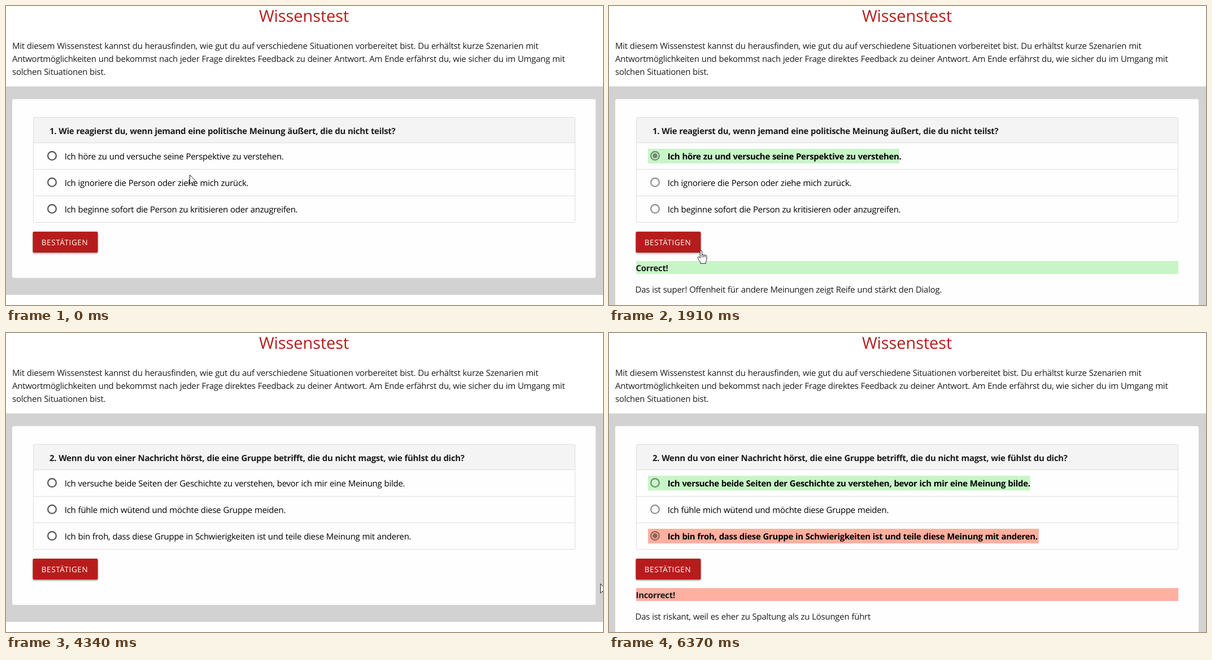
Write an HTML page that moves like this. It is 1057 px wide and 530 px high and loops after 6950 ms.

```html
<!DOCTYPE html>
<html lang="de">
<head>
<meta charset="utf-8">
<title>Wissenstest</title>
<style>
html, body { margin: 0; width: 100%; height: 100%; overflow: hidden; background: #fff; }
svg { display: block; width: 1057px; height: 530px; }
text {
  font: 15px "Open Sans", "Noto Sans", sans-serif;
  letter-spacing: -.265px; word-spacing: .4px;
  text-rendering: geometricPrecision; fill: #000; white-space: pre;
}
.intro, .note { fill: #1c1c1c; }
.bold { font-weight: 700; letter-spacing: -.31px; }
.head { fill: #1c1c1c; }
.title { font-size: 29px; letter-spacing: -.1px; fill: #b71c1c; text-anchor: middle; }
.label { font-size: 13.5px; letter-spacing: .58px; fill: #fff; }
.button { fill: #b71c1c; filter: drop-shadow(0 2px 1.2px rgba(0,0,0,.28)) drop-shadow(0 0 1.5px rgba(0,0,0,.16)); }
.grid { fill: none; stroke: #ddd; }
.ring { fill: none; stroke-width: 2.2; }
.cursor { fill: #fff; stroke: #222; stroke-width: 1; stroke-linejoin: round; }
</style>
</head>
<body>
<svg viewBox="0 0 1057 530">
  <text class="title" x="527.5" y="28">Wissenstest</text>
  <text class="intro" x="11" y="76">Mit diesem Wissenstest kannst du herausfinden, wie gut du auf verschiedene Situationen vorbereitet bist. Du erhältst kurze Szenarien mit</text>
  <text class="intro" x="11" y="99">Antwortmöglichkeiten und bekommst nach jeder Frage direktes Feedback zu deiner Antwort. Am Ende erfährst du, wie sicher du im Umgang mit</text>
  <text class="intro" x="11" y="122">solchen Situationen bist.</text>
  <g id="quiz"></g>
  <rect class="button" x="47.5" y="400" width="115" height="37" rx="2"/>
  <text class="label" x="62.8" y="424.3">BESTÄTIGEN</text>
  <g id="pointer">
    <circle id="flash" r="11.7" cy="-1" fill="#ffcf00" fill-opacity=".6"/>
    <path id="arrow" class="cursor" d="M.5 .5V17L4.3 13.4L6.8 19.2L9.2 18.2L6.8 12.4H12Z"/>
    <g id="hand" class="cursor">
      <path d="M-1.6 1.2Q0 -1 1.6 1.2V8Q3.2 6.6 4.5 8.4Q6 7.2 7.2 9Q8.6 8 10 9.8V16Q10 19 8.2 20.6V23.4H-1V21Q-3.6 18.4 -5.8 13.6Q-6.4 11.4 -4.6 11.4Q-3.2 11.8 -1.6 14Z"/>
      <path d="M1.6 8V12.5M4.5 8.6V12.5M7.2 9.2V12.5" fill="none"/>
    </g>
  </g>
</svg>
<script>
const LOOP = 6950, STEP = 60;
const GREEN = '#c8f5c8', RED = '#ffb0a0';
const $ = id => document.getElementById(id);

// each option: text, right edge of its label
const questions = [
  {
    head: '1. Wie reagierst du, wenn jemand eine politische Meinung äußert, die du nicht teilst?',
    options: [
      ['Ich höre zu und versuche seine Perspektive zu verstehen.', 514],
      ['Ich ignoriere die Person oder ziehe mich zurück.', 430],
      ['Ich beginne sofort die Person zu kritisieren oder anzugreifen.', 517]
    ],
    pick: 0, verdict: 'Correct!', color: GREEN,
    note: 'Das ist super! Offenheit für andere Meinungen zeigt Reife und stärkt den Dialog.'
  },
  {
    head: '2. Wenn du von einer Nachricht hörst, die eine Gruppe betrifft, die du nicht magst, wie fühlst du dich?',
    options: [
      ['Ich versuche beide Seiten der Geschichte zu verstehen, bevor ich mir eine Meinung bilde.', 745.5],
      ['Ich fühle mich wütend und möchte diese Gruppe meiden.', 495],
      ['Ich bin froh, dass diese Gruppe in Schwierigkeiten ist und teile diese Meinung mit anderen.', 761]
    ],
    pick: 2, verdict: 'Incorrect!', color: RED,
    note: 'Das ist riskant, weil es eher zu Spaltung als zu Lösungen führt'
  }
];

// each click leads to the next stage: open, picked, answered, next question
const clicks = [710, 1430, 3570, 5170, 6010];
const holds = [0, 710, 2380, 3570, 4340, 5170];

// pointer glides: start, end, x, y, bow
const origin = [325, 299];
const glides = [
  [60, 540, 162, 270, -8], [770, 1010, 132.5, 425.5], [1010, 1370, 140, 434],
  [1610, 1910, 163, 433], [1910, 2090, 170, 452],
  [2380, 2740, 846, 472], [2740, 3040, 216, 361], [3040, 3400, 93, 417.5, -58],
  [3750, 4050, 1060, 446], [4280, 4340, 1052, 444], [4340, 4940, 610, 360, -60],
  [5170, 5830, 147, 409], [6190, 6370, 190, 540]
];

const rect = (x, y, w, h, fill, rx = 0) =>
  `<rect x="${x}" y="${y}" width="${w}" height="${h}" fill="${fill}" rx="${rx}"/>`;
const text = (x, y, cls, s) => `<text x="${x}" y="${y}" class="${cls}">${s}</text>`;
const rowY = i => 265.5 + 47 * i;

function radio(y, on, done) {
  const color = on && !done ? '#b71c1c' : '#000';
  const alpha = done ? .44 : on ? 1 : .67;
  return `<g opacity="${alpha}"><circle class="ring" cx="81.5" cy="${y}" r="7.4" stroke="${color}"/>` +
    (on ? `<circle cx="81.5" cy="${y}" r="4.4" fill="${color}"/>` : '') + '</g>';
}

function drawQuiz(q, picked, done) {
  let out = rect(0, 142.5, 1057, done ? 400 : 369.5, '#d2d2d2') +
    rect(11, 165, 1033, done ? 400 : 317, '#fefefe', 3) +
    rect(48, 198, 960, 44, '#f4f4f5', 2) +
    '<rect class="grid" x="48.5" y="197.5" width="959" height="186" rx="2"/>' +
    '<path class="grid" d="M48 242.5H1008M48 289.5H1008M48 336.5H1008"/>' +
    text(77, 226.5, 'bold head', q.head);
  q.options.forEach(([label, right], i) => {
    const y = rowY(i), chosen = picked && i === q.pick;
    const marked = done && (i === 0 || chosen);
    if (marked) out += rect(69, y - 12.5, right - 69, 26, i ? RED : GREEN);
    out += radio(y, chosen, done) + text(103.8, y + 6.7, marked ? 'bold' : '', label);
  });
  if (done) out += rect(48, 452, 960, 23, q.color) +
    text(47.5, 470, 'bold head', q.verdict) + text(46.5, 508.3, 'note', q.note);
  $('quiz').innerHTML = out;
}

function pointAt(t) {
  let [x, y] = origin;
  for (const [start, end, toX, toY, bow = 0] of glides) {
    if (t < start) break;
    const k = Math.min(1, (t - start) / (end - start));
    const ease = k * k * (3 - 2 * k);
    x += (toX - x) * ease;
    y += (toY - y) * ease + bow * Math.sin(Math.PI * ease);
  }
  return [x, y];
}

function isLink(x, y, q, done) {
  if (x >= 47 && x <= 164 && y >= 400 && y <= 437) return true;
  return !done && q.options.some(([, right], i) =>
    x > 69 && x < right && Math.abs(y - rowY(i)) < 13);
}

const show = (id, on) => $(id).style.display = on ? '' : 'none';

let shown = -1;
function draw(now) {
  const time = now % LOOP;
  const start = holds.filter(h => h <= time).pop();
  const t = start + Math.floor((time - start) / STEP) * STEP;

  // a radio reacts at once, the button a little later
  const stage = clicks.filter((c, i) => t >= c + (i % 3 ? 180 : 60)).length;
  const q = questions[Math.floor(stage / 3)];
  const picked = stage % 3 > 0, done = stage % 3 === 2;
  if (stage !== shown) drawQuiz(q, picked, done);
  shown = stage;

  const [x, y] = pointAt(t);
  const link = isLink(x, y, q, done);
  $('pointer').setAttribute('transform', `translate(${x.toFixed(1)} ${y.toFixed(1)})`);
  show('hand', link);
  show('arrow', !link);
  show('flash', clicks.some(c => t >= c && t < c + 120));
}

const begin = performance.now();
function tick() {
  draw(performance.now() - begin);
  requestAnimationFrame(tick);
}
tick();
</script>
</body>
</html>
```
